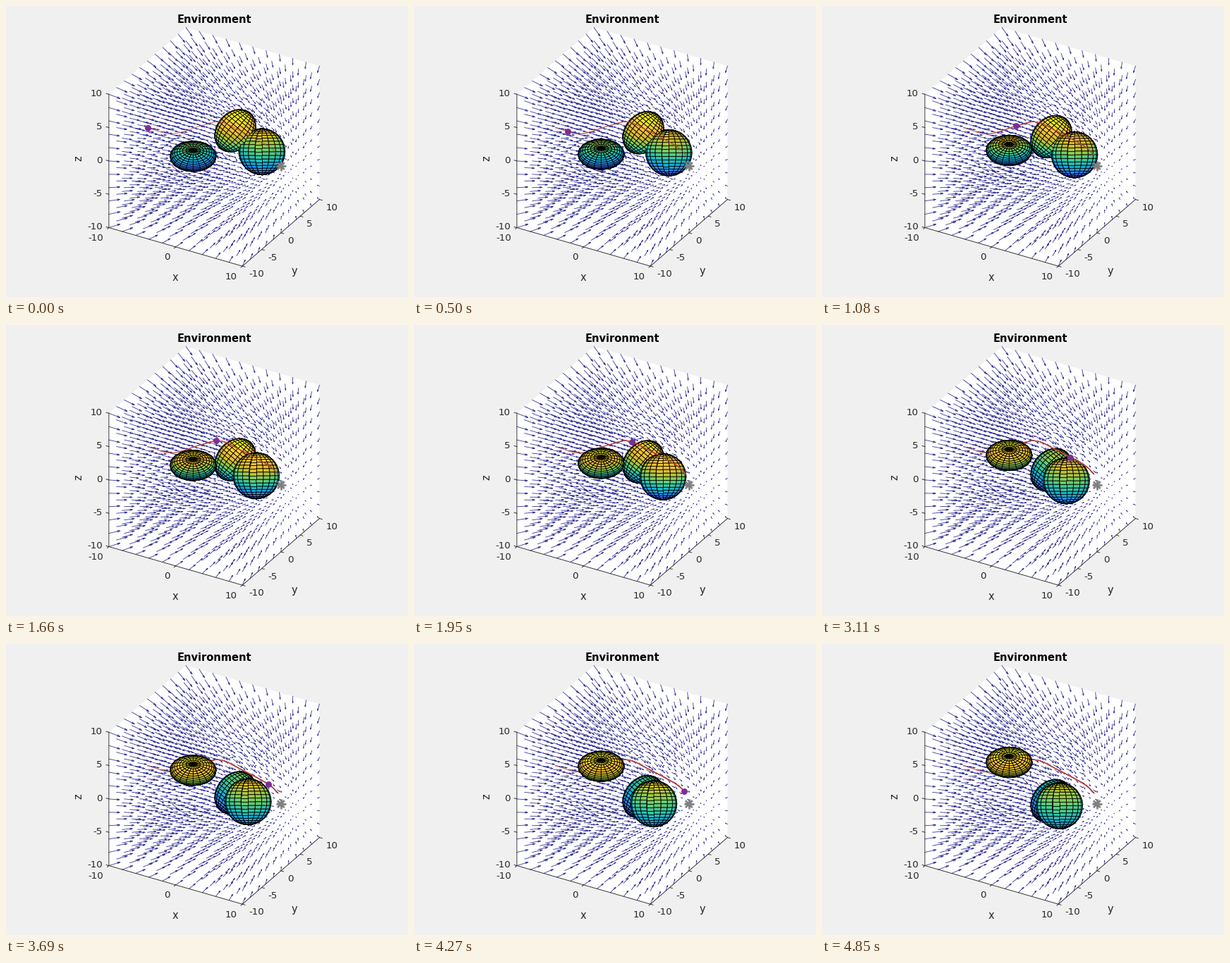
Write a matplotlib script that moves like this. It is 570x413 px and loops after 5140 ms.

```python
import numpy as np
import matplotlib.pyplot as plt
from matplotlib.animation import FuncAnimation
from matplotlib.collections import PolyCollection
from matplotlib.colors import LinearSegmentedColormap

W, H, DPI = 570, 413, 100
PX = 72 / DPI                      # points per pixel
STEP_MS, FIRST_MS, HOLD_MS, STATES = 20, 500, 290, 17
LOOP_MS = FIRST_MS + HOLD_MS * (STATES - 1)
ROBOT_STATES = 15                  # the robot is gone after these

# Orthographic view, 30 degrees round and 30 degrees up
SCALE, ORIGIN = 10.93, np.array([294.7, 199.4])
C30, S30 = np.cos(np.pi / 6), 0.5
RIGHT = np.array([C30, S30, 0])
UP = np.array([-S30 * S30, C30 * S30, C30])
CAMERA = np.array([S30 * C30, -C30 * C30, S30])

INK = "#262626"
PARULA = LinearSegmentedColormap.from_list("heat", [
    "#3e26a8", "#4754f2", "#2e87f7", "#0db0d6", "#37c69c",
    "#81cc59", "#d4bb29", "#fec338", "#f9fb15"])
GOAL = np.array([10.0, 0.0, 0.0])


def project(p):
    p = np.asarray(p, float)
    return ORIGIN + SCALE * np.stack([p @ RIGHT, -(p @ UP)], axis=-1)


class Body:
    """Ellipsoid whose pole leans sideways (roll) and to the viewer (tilt)."""

    def __init__(self, centre, axes, velocity, roll=0, tilt=0):
        self.start, self.axes = np.array(centre, float), np.array(axes)
        self.velocity = np.array(velocity)
        r, t = np.radians([roll, tilt])
        side = np.cos(r) * RIGHT - np.sin(r) * UP
        pole = np.cos(t) * (np.sin(r) * RIGHT + np.cos(r) * UP) + np.sin(t) * CAMERA
        self.basis = np.array([side, np.cross(pole, side), pole])

    def mesh(self, k, n=20):
        """Quads, depths and heights of the faces turned to the viewer."""
        theta, phi = np.meshgrid(np.linspace(-np.pi, np.pi, n + 1),
                                 np.linspace(-np.pi / 2, np.pi / 2, n + 1))
        unit = np.stack([np.cos(phi) * np.cos(theta),
                         np.cos(phi) * np.sin(theta), np.sin(phi)], axis=-1)
        p = self.start + k * self.velocity + (self.axes * unit) @ self.basis
        quads = np.stack([p[:-1, :-1], p[:-1, 1:], p[1:, 1:], p[1:, :-1]],
                         axis=2).reshape(-1, 4, 3)
        mid = quads.mean(axis=1)
        local = (mid - self.start - k * self.velocity) @ self.basis.T
        normal = (local / self.axes**2) @ self.basis
        front = normal @ CAMERA > -0.25 * np.linalg.norm(normal, axis=1)
        return quads[front], mid[front] @ CAMERA, quads[front][:, 0, 2]

    def heights(self, k):
        reach = np.linalg.norm(self.axes * self.basis[:, 2])
        z = self.start[2] + k * self.velocity[2]
        return z - reach, z + reach

    def bend(self, pos, vel):
        """Turn the flow along the surface, zero inside."""
        d = (pos - self.start) @ self.basis.T
        gamma = ((d / self.axes) ** 2).sum(1, keepdims=True)
        n = (d / self.axes**2) @ self.basis
        n /= np.linalg.norm(n, axis=1, keepdims=True) + 1e-9
        turned = vel - 2 * n * (n * vel).sum(1, keepdims=True)
        return np.where(gamma > 1, vel + turned / np.maximum(gamma, 1), 0)


LENS = Body((-2, -2, -1), (3, 1.9, 3), (0, 0, 0.3), tilt=75)
EGG = Body((2, 2, 2), (2.4, 3, 3), (0, 0, -0.3), roll=40)
BALL = Body((6, 2, 0), (3, 3, 3), (0, -0.3, 0))
BODIES = [LENS, EGG, BALL]


def flow_arrows():
    """Pull towards the goal, bent round the bodies."""
    g = np.linspace(-10, 10, 11)
    pos = np.stack(np.meshgrid(g, g, g), axis=-1).reshape(-1, 3)
    vel = GOAL - pos
    for body in BODIES:
        vel = body.bend(pos, vel)
    tail, tip = project(pos), project(pos + 0.066 * vel)
    v = tip - tail
    side = 0.07 * np.stack([-v[:, 1], v[:, 0]], axis=1)
    back = tip - 0.22 * v
    gap = np.full_like(tip, np.nan)
    return np.stack([tail, tip, gap, back + side, tip, back - side, gap],
                    axis=1).reshape(-1, 2)


def scene(k):
    """Sorted polygons and colours of the rear and front layer."""
    span = np.array([b.heights(k) for b in BODIES])
    low, high = span[:, 0].min(), span[:, 1].max()
    layers = []
    for group in ([EGG, BALL], [LENS]):
        quads, depth, z = (np.concatenate(part)
                           for part in zip(*[b.mesh(k) for b in group]))
        order = np.argsort(depth)
        layers.append((project(quads[order]),
                       PARULA((z[order] - low) / (high - low))))
    return layers


def smooth(points, n=20):
    """Smooth curve through a few points."""
    p = np.array(points, float)
    m = np.gradient(p, axis=0)
    t = np.linspace(0, 1, n, endpoint=False)[:, None]
    parts = [(2*t**3 - 3*t**2 + 1) * a + (t**3 - 2*t**2 + t) * u
             + (3*t**2 - 2*t**3) * b + (t**3 - t**2) * v
             for a, b, u, v in zip(p[:-1], p[1:], m[:-1], m[1:])]
    return np.vstack(parts + [p[-1:]])


def robot_x(k):
    """Quick start, then a steady drift past the bodies."""
    return np.interp(k, [0, 1, 3, 8, 12, 14], [200, 217.3, 274.3, 332, 371, 382.5])


fig = plt.figure(figsize=(W / DPI, H / DPI), dpi=DPI, facecolor="#f0f0f0")
ax = fig.add_axes([0, 0, 1, 1])
ax.set_xlim(-0.5, W - 0.5)
ax.set_ylim(H - 0.5, -0.5)
ax.axis("off")


def line(p, color, width, z, **kw):
    p = np.asarray(p)
    return ax.plot(p[:, 0], p[:, 1], color=color, lw=width * PX, zorder=z, **kw)[0]


def label(x, y, s, size=13.33, ha="center", color=INK, **kw):
    ax.text(x, y, s, fontsize=size * PX, ha=ha, va="center_baseline",
            family="DejaVu Sans", color=color, **kw)


def tick(at, out, text, shift, ha):
    """Tick mark at a point of the box, with its number."""
    a = project(at)
    line([a, project(np.add(at, np.array(out) * 0.4))], INK, 0.9, 2)
    if text is not None:
        label(*(a + shift), str(text), ha=ha)


box = project([(-10, -10, -10), (-10, -10, 10), (-10, 10, 10),
               (10, 10, 10), (10, 10, -10), (10, -10, -10)])
ax.fill(box[:, 0], box[:, 1], color="white", lw=0, zorder=0)
line(box[[1, 0, 5, 4]], INK, 0.9, 2)
for v in range(-10, 11, 5):
    tick((-10, -10, v), (-1, 0, 0), v, (-9.2, -2.2), "right")
    tick((10, v, -10), (1, 0, 0), v, (9.2, 10.2), "left")
    if v % 10 == 0:
        tick((v, -10, -10), (0, -1, 0), v, (-8, 13.6), "right")
label(239.5, 384, "x", 14.67)
label(408.5, 375, "y", 14.67)
label(102, 218, "z", 14.67, rotation=90)
label(294.5, 17.7, "Environment", 14.67, weight="bold", color="black")

line(flow_arrows(), "#38389a", 0.85, 1)

for angle in np.arange(4) * np.pi / 4:
    spoke = 7 * np.array([np.cos(angle), np.sin(angle)])
    line([project(GOAL) - spoke, project(GOAL) + spoke], "#808080", 2.8, 7,
         solid_capstyle="butt")

# The rest of the route is drawn again in every state, so it grows heavier
route = smooth([(200, 172.2), (235, 181), (274.3, 170), (303, 164),
                (332, 177), (371, 198.2), (385, 211)])
strokes = [line(route[route[:, 0] >= robot_x(k) - 0.1], "#b8443f", 1, 5, alpha=0.8)
           for k in range(STATES)]
robot, = ax.plot([], [], "o", ms=9 * PX, mew=0, color="#7e2f8e", zorder=5.5)

layers = [PolyCollection([], edgecolors="black", linewidths=0.85 * PX, zorder=z)
          for z in (3, 6)]
for layer in layers:
    ax.add_collection(layer, autolim=False)
scenes = [scene(k) for k in range(STATES)]


def update(i):
    t = i * STEP_MS + STEP_MS / 2
    k = 0 if t < FIRST_MS else int((t - FIRST_MS) // HOLD_MS) + 1
    for layer, (polys, colors) in zip(layers, scenes[k]):
        layer.set_verts(polys)
        layer.set_facecolor(colors)
    for j, stroke in enumerate(strokes):
        stroke.set_visible(j <= k)
    x = robot_x(k)
    robot.set_data([x], [np.interp(x, route[:, 0], route[:, 1])])
    robot.set_visible(k < ROBOT_STATES)
    return [*layers, *strokes, robot]


anim = FuncAnimation(fig, update, frames=LOOP_MS // STEP_MS, interval=STEP_MS,
                     init_func=lambda: update(0), repeat=True, repeat_delay=0,
                     blit=False)
plt.show()
```
